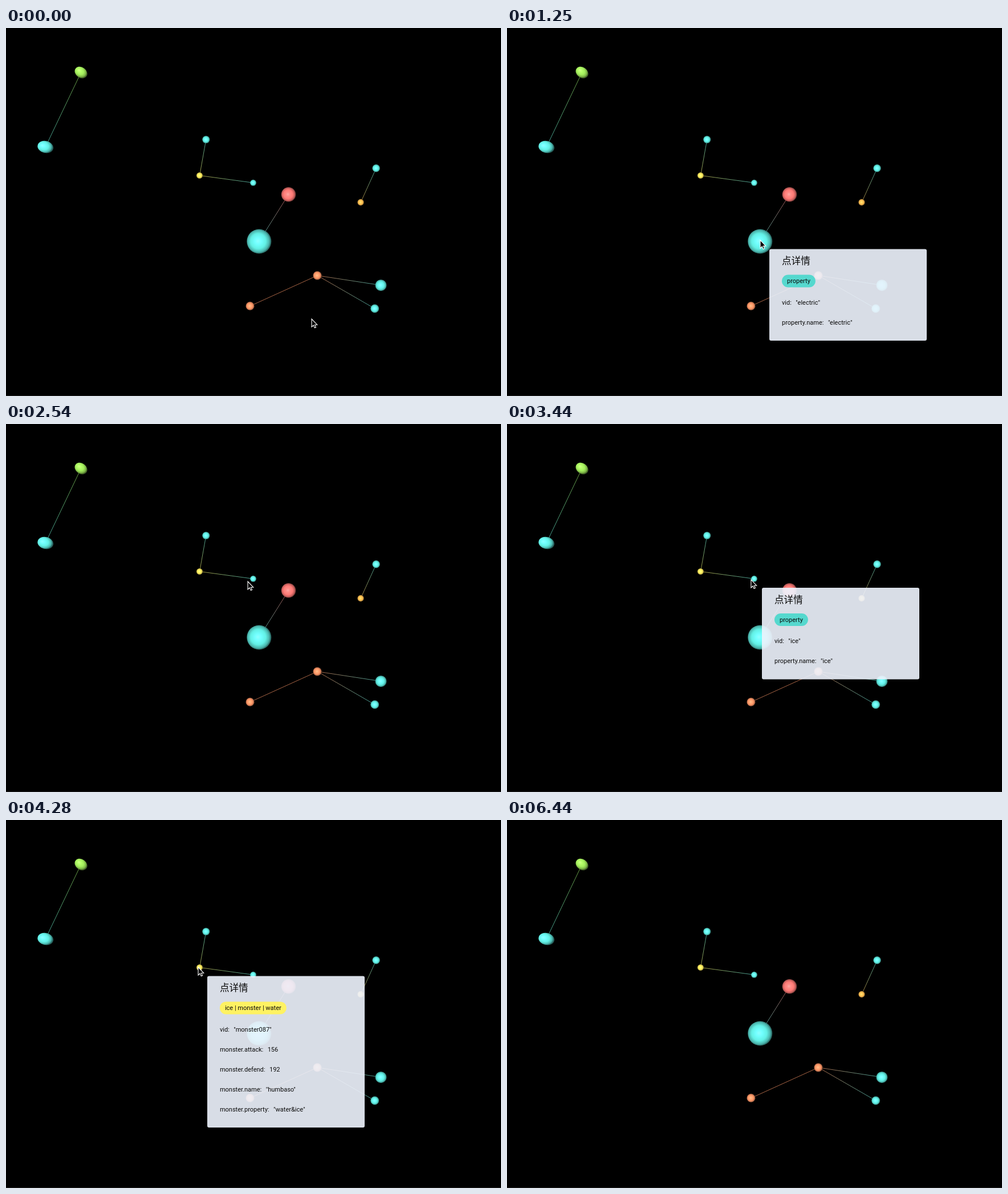
An HTML page with a canvas for the animation above (7280 ms loop, 868 px wide and 645 px high).

```html
<!DOCTYPE html>
<html lang="zh">
<head>
<meta charset="utf-8">
<title>Graph node details</title>
<style>
  html, body { margin: 0; width: 100%; height: 100%; overflow: hidden; background: #000; }
  canvas { display: block; }
</style>
</head>
<body>
<canvas id="stage" width="868" height="645"></canvas>
<script>
const LOOP = 7280;
const ctx = document.getElementById('stage').getContext('2d');

const TEAL = [98, 240, 229], RED = [255, 122, 118], YELLOW = [250, 232, 94];
const ORANGE = [255, 152, 104], AMBER = [255, 190, 82], GREEN = [162, 236, 92];

// x, y, colour, radius, then for stretched spheres: second radius, tilt
const nodes = [
  [131, 77.5, GREEN, 11.8, 9.2, 0.62],
  [68.7, 208, TEAL, 14, 10.5, 0.22],
  [350.3, 195, TEAL, 6.6],
  [339, 258, YELLOW, 5.6],
  [433, 270.8, TEAL, 5.5],
  [495, 291.3, RED, 12.8],
  [443.3, 373.5, TEAL, 21.5],
  [545.5, 433.3, ORANGE, 7.6],
  [427.5, 486.8, ORANGE, 7.5],
  [657, 450.4, TEAL, 10],
  [646.2, 491.3, TEAL, 7.5],
  [648.6, 245.3, TEAL, 6.8],
  [621.5, 305, AMBER, 5.7],
];
const links = [[0, 1], [2, 3], [3, 4], [5, 6], [7, 8], [7, 9], [7, 10], [11, 12]];

// time, x, y of the pointer tip
const path = [
  [20, 536, 510], [510, 444.5, 372.5], [620, 443.5, 371.5], [860, 443.5, 371.5],
  [950, 444, 372], [1250, 444, 372], [1610, 499.5, 291], [1720, 499.5, 287],
  [1989, 499.5, 287], [1990, 498, 288], [2280, 498, 288], [2540, 424, 276],
  [2970, 431, 271.5], [3439, 431, 271.5], [3440, 428, 273], [3880, 330, 253.5],
  [4140, 335.5, 256], [4280, 337, 258], [5360, 337, 258], [5860, 715, 827],
];

const cards = [
  { from: 490, to: 1400, hold: 1220, tag: 'property', color: '#55d8ce',
    rows: [['vid:', '"electric"'], ['property.name:', '"electric"']] },
  { from: 1580, to: 2380, hold: 1960, tag: 'electric | monster', color: '#fe7570',
    rows: monster('026', 200, 154, 'zaribo', 'electric') },
  { from: 2760, to: 3490, hold: 3410, tag: 'property', color: '#55d8ce',
    rows: [['vid:', '"ice"'], ['property.name:', '"ice"']] },
  { from: 4030, to: 6440, hold: 5330, tag: 'ice | monster | water', color: '#fef262',
    rows: monster('087', 156, 192, 'humbaso', 'water&ice') },
];

function monster(id, attack, defend, name, property) {
  return [['vid:', `"monster${id}"`], ['monster.attack:', attack], ['monster.defend:', defend],
    ['monster.name:', `"${name}"`], ['monster.property:', `"${property}"`]];
}

const shade = (color, k, alpha = 1, lift = 0) =>
  `rgba(${color.map(v => Math.min(255, Math.round(v * k + lift)))},${alpha})`;

// a hand speeds up quickly and settles slowly
function handEase(u) {
  const s = u ** 0.7;
  return s * s * (3 - 2 * s);
}

function pointerAt(t) {
  const i = path.findIndex(key => key[0] > t);
  if (i <= 0) return (i ? path[path.length - 1] : path[0]).slice(1);
  const a = path[i - 1], b = path[i];
  const e = handEase((t - a[0]) / (b[0] - a[0]));
  return [a[1] + (b[1] - a[1]) * e, a[2] + (b[2] - a[2]) * e];
}

function drawLink([from, to]) {
  const [x1, y1, c1] = nodes[from], [x2, y2, c2] = nodes[to];
  const g = ctx.createLinearGradient(x1, y1, x2, y2);
  g.addColorStop(0, shade(c1, 1, 0.64));
  g.addColorStop(1, shade(c2, 1, 0.64));
  ctx.strokeStyle = g;
  ctx.lineWidth = 1;
  ctx.beginPath();
  ctx.moveTo(x1, y1);
  ctx.lineTo(x2, y2);
  ctx.stroke();
}

function drawNode([x, y, color, rx, ry = rx, tilt = 0]) {
  const lit = rx === ry ? -0.1 : -0.45;
  ctx.save();
  ctx.translate(x, y);
  ctx.rotate(tilt);
  ctx.scale(rx, ry);
  const g = ctx.createRadialGradient(lit, lit * 0.3, 0, lit * 0.5, lit * 0.15, 1 - lit * 0.3);
  g.addColorStop(0, shade(color, 1.05, 1, 40));
  g.addColorStop(0.25, shade(color, 1.08, 1, 8));
  g.addColorStop(0.6, shade(color, 1));
  g.addColorStop(0.86, shade(color, 0.75));
  g.addColorStop(1, shade(color, 0.4));
  ctx.fillStyle = g;
  ctx.beginPath();
  ctx.arc(0, 0, 1, 0, 7);
  ctx.fill();
  ctx.restore();
}

function box(x, y, w, h, r, color) {
  ctx.fillStyle = color;
  ctx.beginPath();
  ctx.roundRect(x, y, w, h, r);
  ctx.fill();
}

function text(str, x, y) {
  ctx.fillStyle = '#0a0a0a';
  ctx.fillText(str, x, y);
  return ctx.measureText(str).width;
}

function drawCard(card, t) {
  const [px, py] = pointerAt(Math.min(t - 30, card.hold));
  ctx.save();
  ctx.translate(px + 16, py + 15.5);
  box(0, 0, 276, 90.5 + 35 * card.rows.length, 3, 'rgba(238,243,253,.91)');
  ctx.font = '500 16.6px "Noto Sans CJK SC", "Noto Sans CJK", sans-serif';
  text('点详情', 22, 26.5);
  ctx.font = '11px Roboto, sans-serif';
  box(22, 45, ctx.measureText(card.tag).width + 18, 22, 11, card.color);
  text(card.tag, 31, 59.5);
  card.rows.forEach(([label, value], i) => {
    const y = 97.3 + 35 * i;
    text(value, 22 + text(label, 22, y) + 7.5, y);
  });
  ctx.restore();
}

const arrow = new Path2D('M0 0V14L3.2 11L5.2 15.6L7.5 14.6L5.5 10.2H9.7Z');

function drawPointer(t) {
  ctx.save();
  ctx.translate(...pointerAt(t));
  ctx.fillStyle = '#000';
  ctx.strokeStyle = '#fff';
  ctx.lineWidth = 1.1;
  ctx.fill(arrow);
  ctx.stroke(arrow);
  ctx.restore();
}

function draw(now) {
  const t = now % LOOP;
  ctx.fillStyle = '#000';
  ctx.fillRect(0, 0, 868, 645);
  ctx.fillStyle = '#1c1c1c';
  ctx.fillRect(0, 644, 868, 1);
  ctx.save();
  ctx.translate(0.5, 0.5); // node coordinates name pixel centres
  links.forEach(drawLink);
  nodes.forEach(drawNode);
  ctx.restore();
  const card = cards.find(c => t >= c.from && t < c.to);
  if (card) drawCard(card, t);
  drawPointer(t);
}

const start = performance.now();
function tick() {
  draw(performance.now() - start);
  requestAnimationFrame(tick);
}
tick();
</script>
</body>
</html>
```
